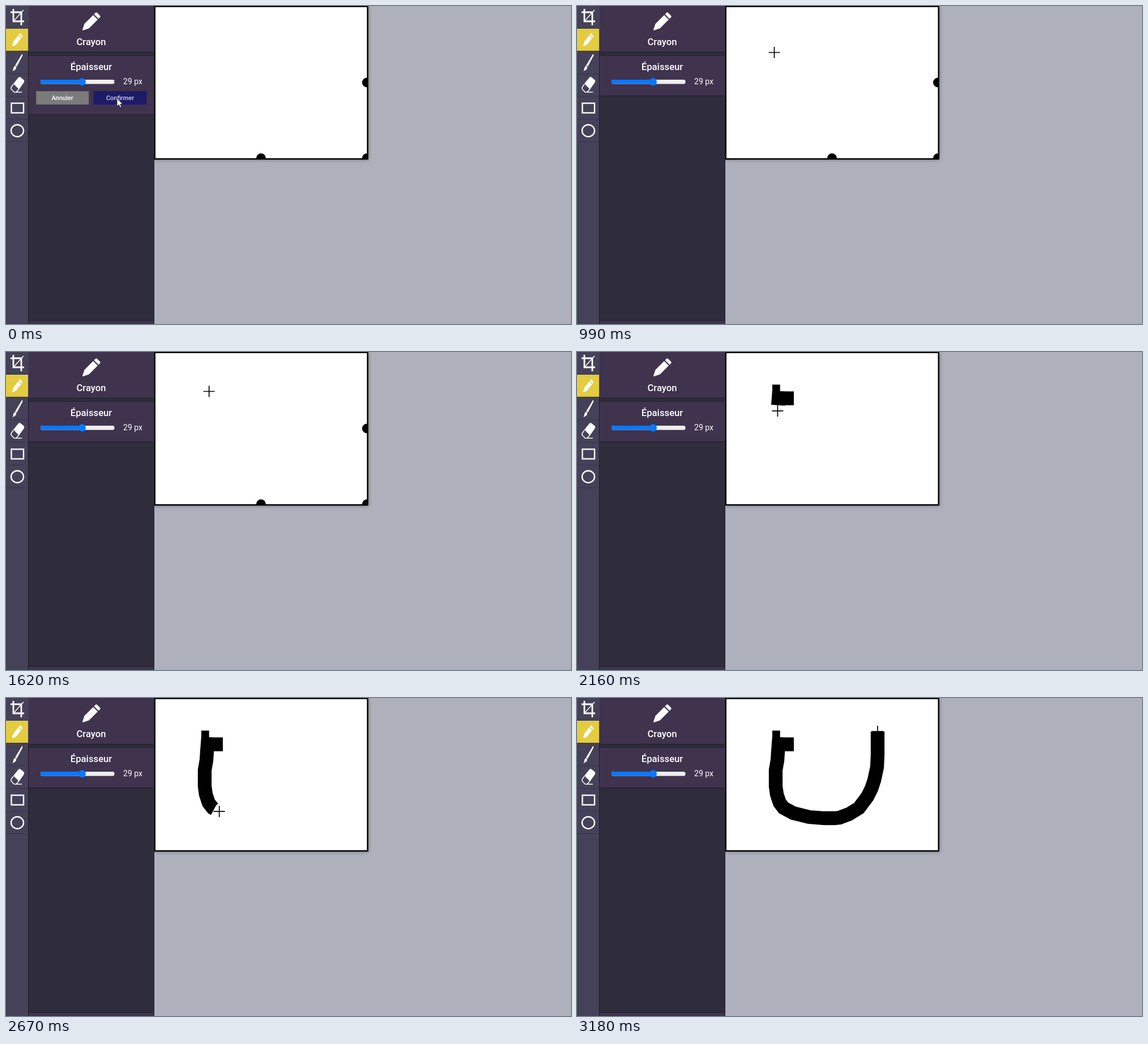
Animation of 998 by 561 pixels, one loop 3630 ms. Source, as an HTML page:

```html
<!DOCTYPE html>
<html lang="fr">
<head>
<meta charset="utf-8">
<style>
  html, body { margin: 0; width: 100%; height: 100%; overflow: hidden; background: #aeb1bc; }
  svg { display: block; width: 998px; height: 561px; }
  text { font: 500 16.7px Roboto, sans-serif; fill: #fff; text-anchor: middle; }
  .small { font-size: 11px; }
  .line { fill: none; stroke: #fff; stroke-width: 2.4; }
  .edge { stroke: #1f1b28; }
  .tool { stroke: #37344a; }
</style>
</head>
<body>
<svg viewBox="0 0 998 561">
  <defs>
    <filter id="shadow" x="-5%" y="-5%" width="110%" height="110%">
      <feDropShadow dx="0" dy="0" stdDeviation="3" flood-opacity=".45"/>
    </filter>
    <clipPath id="page"><rect x="262" width="377" height="270"/></clipPath>
    <g id="pencil" fill="#fff">
      <path d="M3.5 20.5 19 5l8 8L11.500 28.500 1 32Q0 32 0 31Z"/>
      <path d="M20.500 3.500 23 1Q24.500-.5 26 1L31 6Q32.500 7.500 31 9L28.500 11.500Z"/>
    </g>
  </defs>

  <rect width="998" height="561" fill="#aeb1bc"/>
  <rect x="262" width="378" height="271" filter="url(#shadow)"/>
  <rect x="264" y="2" width="373.500" height="266.500" fill="#fff"/>
  <g id="handles" clip-path="url(#page)">
    <circle cx="637.500" cy="135" r="8.500"/>
    <circle cx="450.500" cy="268.500" r="8.500"/>
    <circle cx="637.500" cy="268.500" r="8.500"/>
  </g>

  <rect width="40" height="561" fill="#444159"/>
  <path class="tool" d="M0 39.500H40M0 79.500H40M0 119.500H40M0 159.500H40M0 199.500H40M0 239.500H40"/>
  <rect y="40" width="39" height="39" fill="#e3cc3f"/>
  <path class="line" d="M13 5V27H32M8 11H27V34" style="stroke-width:2.800"/>
  <path class="line" d="M13 27 31 7" style="stroke-width:1.500"/>
  <use href="#pencil" transform="translate(11 48) scale(.57 .72)"/>
  <path fill="#fff" d="M28 85Q30 85 29 88L19 107 16 105ZM15.500 105.500 18.500 108Q17 114 11 114.500 13 113 13 110 13.500 107 15.500 105.500Z"/>
  <path fill="#fff" d="M13 137 22 126Q24 124 26 126L31 130Q33 132 31.500 135L23 147Z"/>
  <path class="line" d="M13 138 9.500 143Q8 145.500 10 147.500L14.500 152H28M18 152 23 146" style="stroke-width:1.500"/>
  <rect class="line" x="9.500" y="171.500" width="21.500" height="17"/>
  <ellipse class="line" cx="20" cy="220" rx="11" ry="10.500"/>

  <rect x="40" width="222" height="561" fill="#2f2d3c"/>
  <rect x="40" width="222" height="82" fill="#3f334e"/>
  <rect id="panel" x="40" y="87" width="222" fill="#3f334e"/>
  <rect x="40" y="555" width="222" height="6" fill="#3f334e"/>
  <path class="edge" d="M40 81.500H262M40 87H262M40 554.500H262M261.500 0V561M39.500 80V561"/>
  <path id="panelEdge" class="edge" d="M40 0H262"/>
  <use href="#pencil" x="135" y="11"/>
  <text x="150.500" y="69">Crayon</text>
  <text x="150.500" y="113">Épaisseur</text>
  <rect x="61" y="130" width="130.500" height="7.500" rx="3" fill="#efefef"/>
  <rect x="61" y="130" width="74" height="7.500" rx="3" fill="#0a78ff"/>
  <circle cx="134.500" cy="133.700" r="6.500" fill="#0a78ff"/>
  <text x="224" y="138" style="font-size:14px;font-weight:400">29 px</text>
  <g id="buttons">
    <rect x="53.500" y="150.500" width="92.500" height="23" fill="#7b7b7b" stroke="#6a6a6e"/>
    <rect x="154.500" y="150" width="94" height="24" fill="#1d1b68"/>
    <text class="small" x="99.500" y="165.500">Annuler</text>
    <text class="small" x="201.500" y="165.500" style="fill:#d2d1e0">Confirmer</text>
  </g>

  <g id="ink">
    <rect x="358.500" y="69.500" width="24.500" height="24.500"/>
    <rect id="cap" x="345" y="57.500" width="13.700" height="24"/>
    <polyline id="stroke" fill="none" stroke="#000" stroke-width="24.300" points="357,69 355,95 354,110 351,127 351,156 353,170 358,185 365,194 382,203 410,210 437,212 455,212 464,211 480,205 498,194 513,174 520,160 525,145 530,122 531,100 531,59"/>
  </g>
  <path id="cross" d="M-10 0H10M0-10V10" stroke="#000" stroke-width="1.700"/>
  <path id="arrow" d="M0 0V14.500L3.300 11.500 5.700 16.500 8 15.500 5.700 10.500H10Z" fill="#fff" stroke="#222" stroke-width=".9"/>
</svg>
<script>
const LOOP = 3630, STEP = 30, DRAW = 1950;
const $ = id => document.getElementById(id);
const show = (id, on) => $(id).setAttribute('display', on ? 'inline' : 'none');
const stroke = $('stroke'), total = stroke.getTotalLength();

// time, x, y of the pointer before drawing
const hover = [
  [360, 196, 162.5], [450, 288, 124], [540, 346, 100.3], [690, 346, 100.3],
  [990, 348.5, 82], [1230, 353.7, 73.3], [1260, 353.7, 73.3], [1320, 355.7, 74],
  [1440, 355.7, 74], [1620, 358.7, 69.5]
];
// time, distance travelled along the stroke
const travel = [
  [DRAW, 0], [2070, 10], [2130, 25], [2160, 35], [2460, 105],
  [2640, 132], [2670, 142], [3000, 357], [3150, total]
];

function sample(keys, t) {
  const i = keys.findIndex(k => k[0] > t);
  if (i < 0) return keys[keys.length - 1].slice(1);
  if (i === 0) return keys[0].slice(1);
  const a = keys[i - 1], b = keys[i], f = (t - a[0]) / (b[0] - a[0]);
  return a.slice(1).map((v, j) => v + (b[j + 1] - v) * f);
}

function render(now) {
  const t = Math.floor(now % LOOP / STEP) * STEP;
  const confirming = t < 30, drawing = t >= DRAW;

  show('buttons', confirming);
  const bottom = confirming ? 191.5 : 158.5;
  $('panel').setAttribute('height', bottom - 87);
  $('panelEdge').setAttribute('transform', `translate(0 ${bottom})`);

  show('handles', !drawing);
  show('ink', drawing);
  let [x, y] = sample(hover, t);
  if (drawing) {
    ({ x, y } = stroke.getPointAtLength(sample(travel, t)[0]));
    const [inked] = sample(travel, t - STEP); // ink trails the pointer by one step
    stroke.setAttribute('stroke-dasharray', `${inked} ${total + 9}`);
    show('cap', inked > 0);
  }
  const onPage = x > 262;
  show('cross', onPage);
  show('arrow', !onPage);
  $(onPage ? 'cross' : 'arrow').setAttribute('transform', `translate(${x} ${y})`);
  requestAnimationFrame(() => render(performance.now() - start));
}
const start = performance.now();
render(0);
</script>
</body>
</html>
```
